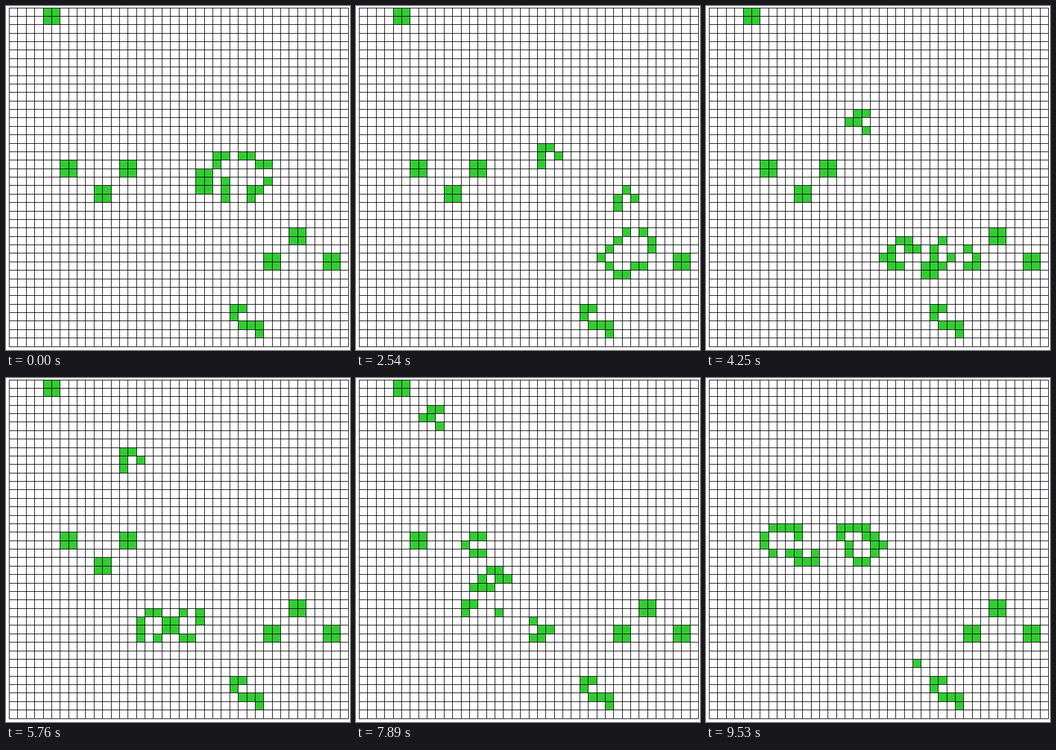
Recreate the animation shown at these times as a matplotlib script. Size 583 px wide and 584 px high, loop 9.55 s.

```python
import numpy as np
import matplotlib.pyplot as plt
from matplotlib.animation import FuncAnimation
from matplotlib.collections import PolyCollection

W, H, DPI = 583, 584, 64
N = 40
PITCH = 14.375
STEP_MS, FRAMES = 25, 382
TICK_MS = 86.5
HOLD_EVERY = 6.65  # ticks between two held generations

# Grid line positions in whole pixels
XS = np.floor(5.6 + PITCH * np.arange(N + 1))
YS = np.floor(3.06 + PITCH * np.arange(N + 1))

# Top-left corners (row, column) of the 2x2 blocks
BLOCKS = [(0, 4), (18, 6), (18, 13), (21, 10), (26, 33), (29, 30), (29, 37),
          (19, 22)]

# Other live cells: columns by row
CELLS = {
    17: [24, 25, 27, 28],
    18: [24, 29, 30],
    20: [25, 30],
    21: [22, 23, 25, 28, 29],
    22: [25, 28],
    35: [26, 27],
    36: [26],
    37: [27, 28, 29],
    38: [29],
}


def seed():
    grid = np.zeros((N, N), int)
    for r, c in BLOCKS:
        grid[r:r + 2, c:c + 2] = 1
    for r, cols in CELLS.items():
        grid[r, cols] = 1
    return grid


def evolve(grid):
    p = np.pad(grid, 1)
    near = sum(p[i:i + N, j:j + N] for i in range(3) for j in range(3)) - grid
    return ((near == 3) | ((grid == 1) & (near == 2))).astype(int)


def generation(i):
    tick = int((i * STEP_MS + 5) / TICK_MS)
    return tick - int((tick - 0.21) / HOLD_EVERY)


def box(x0, y0, x1, y1):
    return [(x0, y0), (x1, y0), (x1, y1), (x0, y1)]


def squares(grid):
    return [box(XS[c] + 1, YS[r] + 1, XS[c + 1], YS[r + 1])
            for r, c in np.argwhere(grid)]


history = [seed()]
for _ in range(generation(FRAMES - 1)):
    history.append(evolve(history[-1]))
shapes = [squares(g) for g in history]

fig = plt.figure(figsize=(W / DPI, H / DPI), dpi=DPI, facecolor="white")
ax = fig.add_axes([0, 0, 1, 1])
ax.set_xlim(0, W)
ax.set_ylim(H, 0)
ax.axis("off")

lines = [box(x, YS[0], x + 1, YS[-1] + 1) for x in XS]
lines += [box(XS[0], y, XS[-1] + 1, y + 1) for y in YS]
ax.add_collection(PolyCollection(lines, facecolors="black", linewidths=0),
                  autolim=False)
live = PolyCollection(shapes[0], facecolors="limegreen", linewidths=0)
ax.add_collection(live, autolim=False)


def update(i):
    live.set_verts(shapes[generation(i)])
    return [live]


anim = FuncAnimation(fig, update, frames=FRAMES, interval=STEP_MS,
                     repeat=True, repeat_delay=0, blit=False)
plt.show()
```
